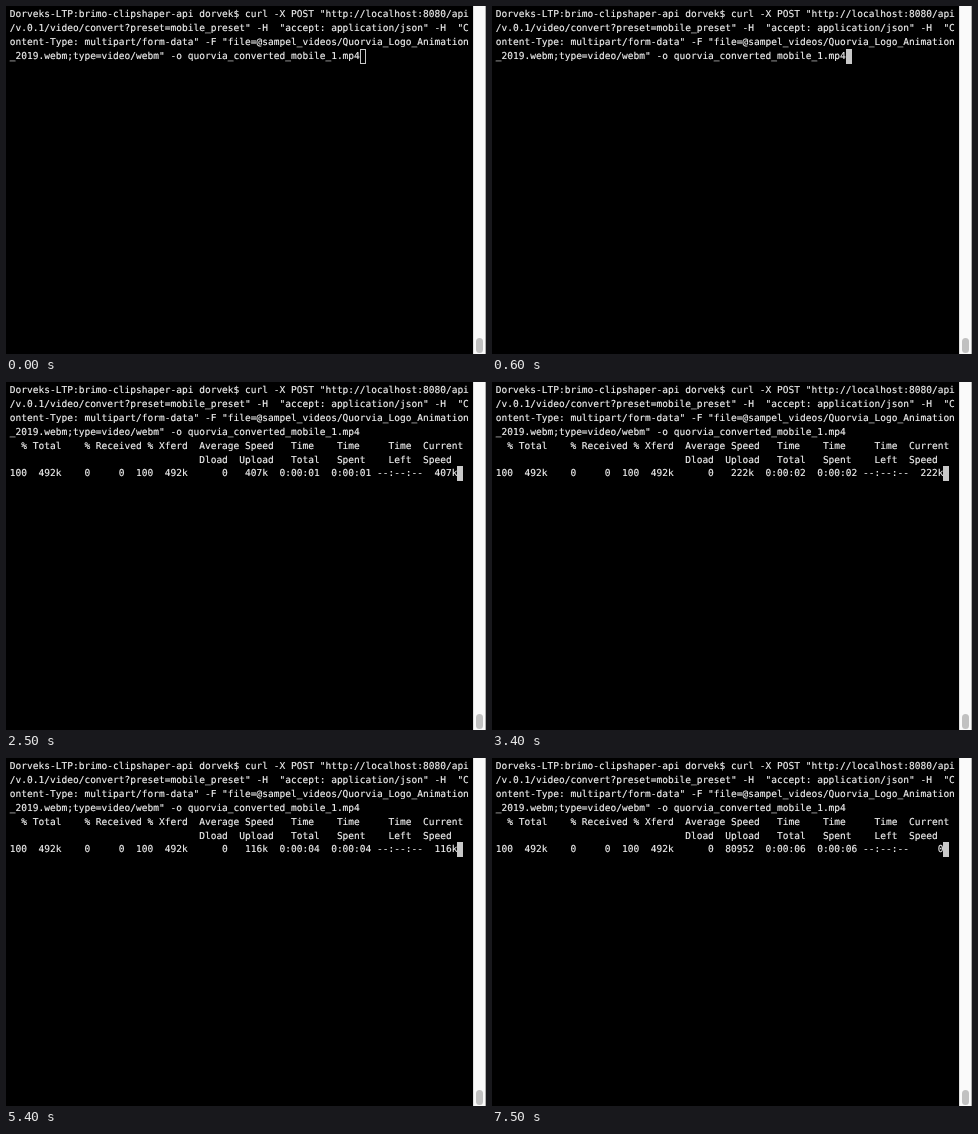
Animation of 480x348 px, one loop 8000 ms. Source, as an HTML page:

```html
<!DOCTYPE html>
<html lang="en">
<head>
<meta charset="utf-8">
<title>Terminal upload</title>
<style>
  html, body { margin: 0; width: 100%; height: 100%; overflow: hidden; background: #000; }
  #stage { position: relative; width: 480px; height: 348px; overflow: hidden; background: #000; }
  #screen {
    position: absolute; left: 3.8px; top: 2px; margin: 0;
    font: 9.54px/13.9px "DejaVu Sans Mono", "Liberation Mono", monospace;
    font-variant-ligatures: none;
    text-rendering: geometricPrecision;
    white-space: pre; color: #f2f2f2;
    -webkit-text-stroke: 0.15px #f2f2f2;
  }
  #cursor {
    display: inline-block; box-sizing: border-box; vertical-align: top;
    width: 6px; height: 14.9px; margin-top: -1px; background: #c8c8c8;
  }
  #cursor.hollow { background: none; border: 1px solid #c8c8c8; }
  #track {
    position: absolute; left: 467px; top: 0; box-sizing: border-box;
    width: 13px; height: 348px; background: #fafafa;
    border: solid #e0e0e0; border-width: 0 1px; border-right-color: #b0b0b0;
  }
  #thumb { position: absolute; left: 2px; top: 332px; width: 7px; height: 15px; border-radius: 4px; background: #c1c1c1; }
</style>
</head>
<body>
<div id="stage">
  <pre id="screen"><span id="text"></span><span id="cursor"></span></pre>
  <div id="track"><div id="thumb"></div></div>
</div>
<script>
const LOOP = 8000;
const IDLE = '--:--:--';

const command = [
  'Dorveks-LTP:brimo-clipshaper-api dorvek$ curl -X POST "http://localhost:8080/api',
  '/v.0.1/video/convert?preset=mobile_preset" -H  "accept: application/json" -H  "C',
  'ontent-Type: multipart/form-data" -F "file=@sampel_videos/Quorvia_Logo_Animation',
  '_2019.webm;type=video/webm" -o quorvia_converted_mobile_1.mp4'
].join('\n');

const header = [
  '  % Total    % Received % Xferd  Average Speed   Time    Time     Time  Current',
  '                                 Dload  Upload   Total   Spent    Left  Speed'
].join('\n');

const pad = (value, width) => String(value).padStart(width);
const amount = (percent, size) => pad(percent, 3) + ' ' + pad(size, 5);

function progress(percent, size, speed, time, current) {
  const sent = amount(percent, size);
  const clock = pad(time, 8);
  const totals = [sent, amount(0, 0), sent, pad(0, 5), pad(speed, 5)].join('  ');
  const row = [totals, clock, clock, IDLE, pad(current, 5)].join(' ');
  return [command, header, row].join('\n');
}

const uploaded = (seconds, speed, current = speed) =>
  progress(100, '492k', speed, '0:00:0' + seconds, current);

const steps = [
  { at: 0, text: command, hollow: true },
  { at: 600, text: command },
  { at: 1200, text: progress(0, 0, 0, IDLE, 0) },
  { at: 2500, text: uploaded(1, '407k') },
  { at: 3400, text: uploaded(2, '222k') },
  { at: 4400, text: uploaded(3, '153k') },
  { at: 5400, text: uploaded(4, '116k') },
  { at: 6500, text: uploaded(5, 96532, 96513) },
  { at: 7500, text: uploaded(6, 80952, 0) }
];

const text = document.getElementById('text');
const cursor = document.getElementById('cursor');
const start = performance.now();
let shown = null;

function draw() {
  const time = (performance.now() - start) % LOOP;
  const step = steps.findLast(s => s.at <= time);
  if (step !== shown) {
    text.textContent = step.text;
    cursor.classList.toggle('hollow', !!step.hollow);
    shown = step;
  }
  requestAnimationFrame(draw);
}
draw();
</script>
</body>
</html>
```
